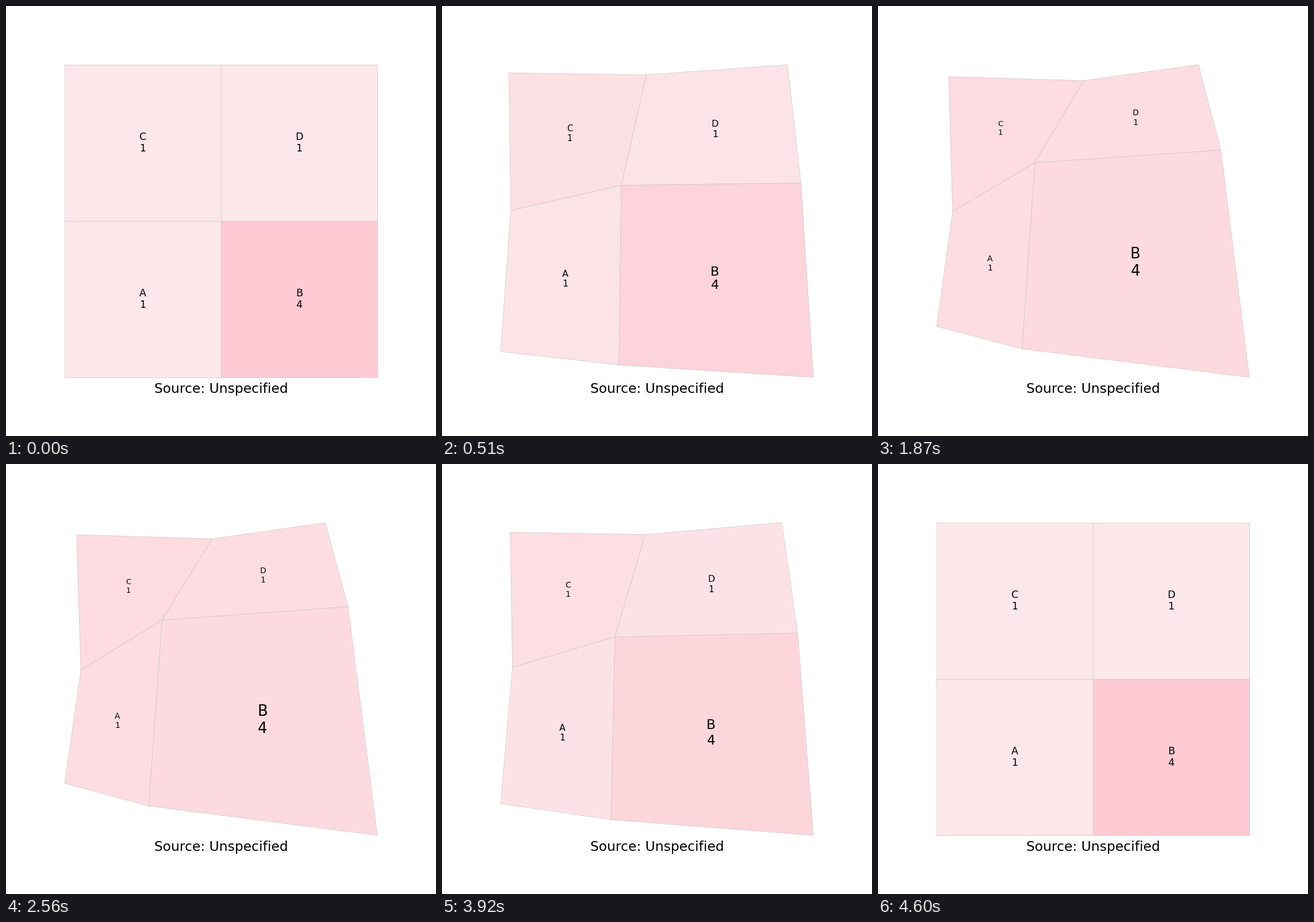
A matplotlib script for the animation above (4.77 s loop, 748 by 748 pixels).

```python
import numpy as np
import matplotlib.pyplot as plt
from matplotlib.animation import FuncAnimation
from matplotlib.patches import Polygon

SIZE, DPI = 748, 100
LEFT, SPAN = 102.0, 544.0        # square that the map always fills
TICK, STEPS, LOOP = 10, 13, 4770
STEP_MS, BACK_MS = 170, 2560     # time per step, start of the way back

NAMES = "CDAB"
VALUES = np.array([1, 1, 1, 4])
WANTED = VALUES / VALUES.sum()
# corner indices of each cell in a 3 x 3 grid of points
CELLS = [[r, r + 1, r + 4, r + 3] for r in (0, 1, 3, 4)]
LIGHT = np.array([252, 231, 234]) / 255
DARK = np.array([254, 202, 211]) / 255
LOG_RANGE = np.log([4 / 7, 16 / 7])


def measure(ring):
    """Area and centroid of a polygon."""
    x, y = ring.T
    xn, yn = np.roll(x, -1), np.roll(y, -1)
    cross = x * yn - xn * y
    area = cross.sum() / 2
    centre = np.array([((x + xn) * cross).sum(), ((y + yn) * cross).sum()])
    return abs(area), centre / (6 * area)


def measure_all(points):
    areas, centres = zip(*(measure(points[c]) for c in CELLS))
    return np.array(areas), np.array(centres)


def distort(points):
    """One pass of the Dougenik cartogram method."""
    areas, centres = measure_all(points)
    goal = areas.sum() * WANTED
    radius = np.sqrt(areas / np.pi)
    mass = np.sqrt(goal / np.pi) - radius
    error = np.mean(np.maximum(areas, goal) / np.minimum(areas, goal))

    delta = points[:, None] - centres
    dist = np.hypot(delta[..., 0], delta[..., 1])
    q = dist / radius
    force = mass * np.where(q > 1, 1 / q, q**2 * (4 - 3 * q))
    shift = (force / dist)[..., None] * delta
    return points + shift.sum(axis=1) / (1 + error)


def fit(points):
    low = points.min(axis=0)
    return LEFT + (points - low) * SPAN / np.ptp(points, axis=0).max()


def shade(density):
    u = np.clip(np.interp(np.log(density), LOG_RANGE, [0, 1]), 0, 1)
    return LIGHT + (DARK - LIGHT) * u


grid = np.array([(x, y) for y in range(3) for x in range(3)], float)
states = [fit(grid)]
for _ in range(STEPS):
    states.append(fit(distort(states[-1])))

plt.rcParams["font.family"] = "DejaVu Sans"
fig = plt.figure(figsize=(SIZE / DPI, SIZE / DPI), dpi=DPI, facecolor="white")
ax = fig.add_axes([0, 0, 1, 1])
ax.set(xlim=(0, SIZE), ylim=(SIZE, 0))
ax.axis("off")

shapes = [ax.add_patch(Polygon(grid[c], edgecolor="#c8c8c8", linewidth=0.5))
          for c in CELLS]
labels = [ax.text(0, 0, f"{n}\n{v}", ha="center", va="center")
          for n, v in zip(NAMES, VALUES)]
ax.text(SIZE / 2, 673.2, "Source: Unspecified", fontsize=16.8,
        ha="center", va="baseline")


def state_at(ms):
    if ms < BACK_MS:
        return min(ms // STEP_MS, STEPS)
    return STEPS - 1 - (ms - BACK_MS) // STEP_MS


def update(frame):
    points = states[state_at(frame * TICK)]
    areas, centres = measure_all(points)
    shares = areas / areas.sum()
    for i, cell in enumerate(CELLS):
        shapes[i].set_xy(points[cell])
        shapes[i].set_facecolor(shade(WANTED[i] / shares[i]))
        labels[i].set_position(centres[i])
        labels[i].set_fontsize(25.2 * np.sqrt(shares[i]))
    return shapes + labels


anim = FuncAnimation(fig, update, frames=LOOP // TICK, interval=TICK,
                     repeat=True, repeat_delay=0)
plt.show()
```
